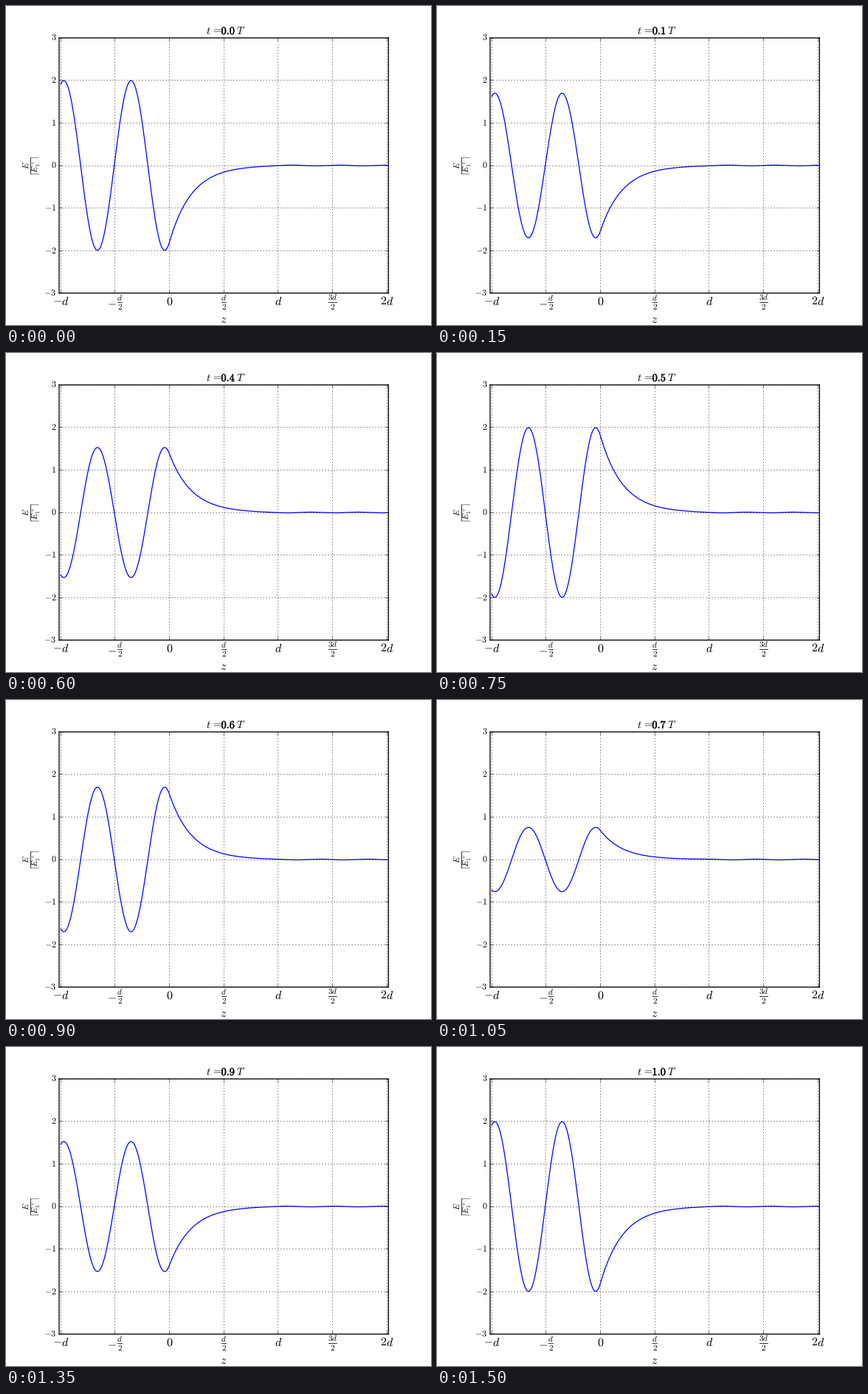
A matplotlib script that plays this animation: 576 px wide and 432 px high, repeating every 1.65 s.

```python
import numpy as np
import matplotlib.pyplot as plt
from matplotlib.animation import FuncAnimation
from matplotlib.lines import Line2D
from matplotlib.patheffects import withStroke
from matplotlib.transforms import Affine2D

W, H, DPI = 576, 432, 72
FRAMES, INTERVAL = 11, 150
LABEL, TITLE, TICK = 16, 14.4, 12
SCRIPT = 0.7 * LABEL

plt.style.use("classic")
plt.rcParams.update({
    "mathtext.fontset": "cm",
    "text.hinting": "none",
    "savefig.dpi": "figure",
    "savefig.facecolor": "white",
})

fig = plt.figure(figsize=(W / DPI, H / DPI), dpi=DPI, facecolor="white")
ax = fig.add_axes([0.125, 0.1, 0.775, 0.8])
ax.set_xlim(-1.015, 2.015)
ax.set_ylim(-3, 3)
ax.set_xticks(np.arange(-1, 2.1, 0.5))
ax.set_yticks(range(-3, 4))
ax.tick_params(labelbottom=False, labelleft=False)
ax.grid(True, linewidth=0.8)

# Grid and ticks snap down to whole pixels; the frame is not snapped
snap_down = Affine2D().translate(-0.45, 0.45)
for tick in ax.xaxis.get_major_ticks() + ax.yaxis.get_major_ticks():
    for line in (tick.gridline, tick.tick1line, tick.tick2line):
        line.set_transform(line.get_transform() + snap_down)
for spine in ax.spines.values():
    spine.set_snap(False)
    spine.set_linewidth(1.3)


def put(x, y, tex, size, ha="center", rotation=0):
    """Math text with its baseline at pixel (x, y), measured from the top left."""
    return fig.text(x / W, 1 - y / H, f"${tex}$", size=size, ha=ha, va="baseline",
                    rotation=rotation, rotation_mode="anchor")


def fraction(x, y, num, den, width, upright=True):
    """Fraction whose bar is centred on pixel (x, y)."""
    half = width / 2
    for tex, shift in ((num, -0.144 * LABEL), (den, 0.595 * LABEL)):
        if upright:
            put(x, y + shift, tex, SCRIPT)
        else:
            put(x + shift, y, tex, SCRIPT, rotation=90)
    dx, dy = (half, 0) if upright else (0, half)
    fig.add_artist(Line2D([(x - dx) / W, (x + dx) / W],
                          [1 - (y - dy) / H, 1 - (y + dy) / H],
                          color="black", lw=0.8))


def tick_x(z):
    return 72 + 446.4 * (z + 1.015) / 3.03


for value in range(-3, 4):
    put(68.3, 216 - 57.6 * value + 3.55, str(value), TICK, ha="right")

BASE = 405.2
AXIS = BASE - 0.25 * LABEL
for z, tex in ((-1, "-d"), (0, "0"), (1, "d"), (2, "2d")):
    put(tick_x(z), BASE, tex, LABEL)
put(tick_x(-0.5) - 4, BASE, "-", LABEL)
fraction(tick_x(-0.5) + 6.4, AXIS, "d", "2", 6)
fraction(tick_x(0.5), AXIS, "d", "2", 6)
fraction(tick_x(1.5), AXIS, "3d", "2", 11.5)
put(295.2, 429, "z", LABEL)
fraction(33.2, 216, "E", "|E_1^+|", 22, upright=False)

put(270.7, 38.2, r"t\hspace{0.116}=", TITLE, ha="left")
put(311.9, 38.2, "T", TITLE, ha="left")
clock = put(301.4, 38.2, "0", TITLE)
clock.set_path_effects([withStroke(linewidth=0.4, foreground="black")])

# Standing wave, evanescent gap of width d, weak transmitted wave
K1, K3 = 10.16, 14.5
PHASE = 0.447
KAPPA = K1 * np.tan(PHASE)
START = 0.073

z = np.linspace(-1, 2, 1201)
edge = -2 * np.cos(PHASE)
echo = (KAPPA + 1j * K3) / (KAPPA - 1j * K3)
incident = -2 * np.cos(K1 * z + PHASE)
gap = edge * (np.exp(-KAPPA * z) + echo * np.exp(KAPPA * (z - 2)))
transmitted = edge * np.exp(-KAPPA) * (1 + echo) * np.exp(1j * K3 * (z - 1))
field = np.where(z < 0, incident, np.where(z < 1, gap, transmitted))

curve, = ax.plot(z, field.real, "b-", lw=1.25)


def update(frame):
    t = frame / 10
    curve.set_ydata((field * np.exp(-1j * (2 * np.pi * t - START))).real)
    clock.set_text(rf"$\mathbf{{{t:.1f}}}$")
    return curve, clock


anim = FuncAnimation(fig, update, frames=FRAMES, interval=INTERVAL,
                     repeat=True, repeat_delay=0, blit=False)
plt.show()
```
